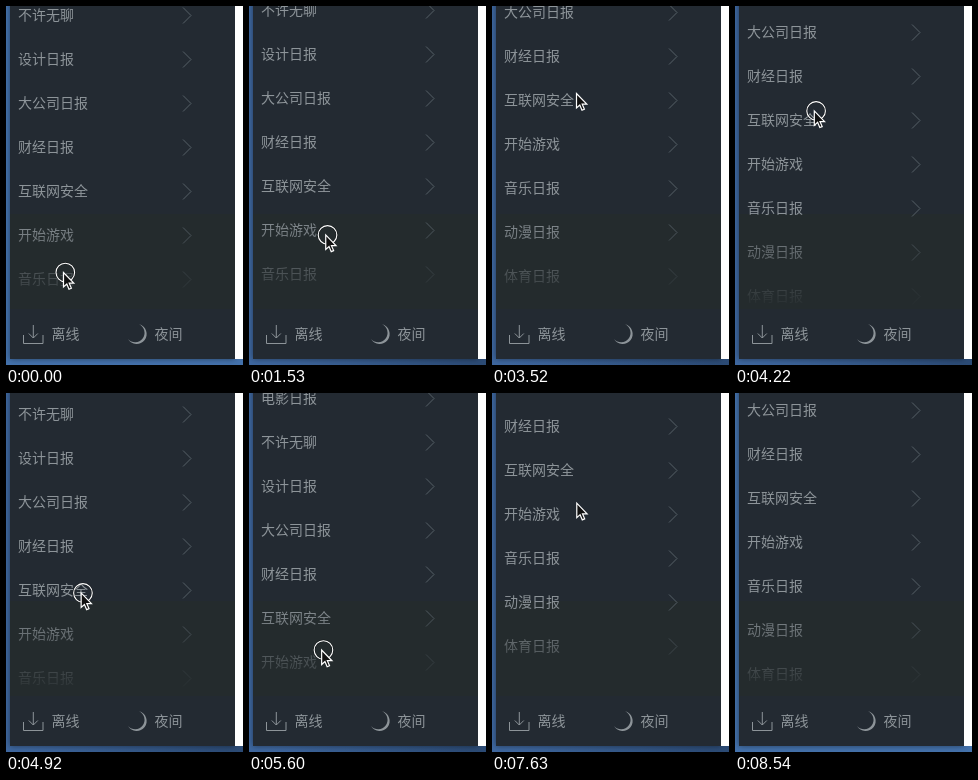
An HTML page with a canvas for the animation above (8650 ms loop, 237 px wide and 359 px high).

```html
<!DOCTYPE html>
<html lang="zh-CN">
<head>
<meta charset="utf-8">
<style>
html, body { margin: 0; width: 237px; height: 359px; overflow: hidden; }
canvas { display: block; }
</style>
</head>
<body>
<canvas width="237" height="359"></canvas>
<script>
const ctx = document.querySelector('canvas').getContext('2d');
const LOOP = 8650, ROW = 44, TOP = 97, END = 17, SLOP = 18, SPRING = 390;
const rows = ['电影日报', '不许无聊', '设计日报', '大公司日报', '财经日报',
  '互联网安全', '开始游戏', '音乐日报', '动漫日报', '体育日报'];

// Pointer moves; it rests in between.
const moves = [
  { from: 710, to: 890, x: 58, y: 273 },
  { from: 1070, to: 1190, x: 75, y: 251 },
  { from: 1370, to: 2540, x: 84, y: 87 },
  { from: 3740, to: 4050, x: 80, y: 77 },
  { from: 4050, to: 5720, x: 72, y: 260, power: 1.5 },
  { from: 6220, to: 6300, x: 73, y: 262 },
  { from: 6300, to: 7330, x: 84, y: 109 },
  { from: 7630, to: 8020, x: 196, y: 365 }
];
const presses = [[0, 50], [1370, 3350], [4050, 5830], [6300, 7630]];

const clamp = (v, lo, hi) => Math.min(hi, Math.max(lo, v));
const easeOut = (p, power) => 1 - (1 - clamp(p, 0, 1)) ** power;

function pointerAt(t) {
  let x = 57, y = 266;
  for (const m of moves) {
    const p = easeOut((t - m.from) / (m.to - m.from), m.power || 1);
    x += (m.x - x) * p;
    y += (m.y - y) * p;
  }
  return { x, y };
}

// Follows the finger, gives half way past the limits, springs back on release.
function scrollAt(t) {
  let home = TOP, position = TOP;
  for (const [press, release] of presses) {
    if (t < press) break;
    const dy = pointerAt(Math.min(t, release)).y - pointerAt(press).y;
    const raw = home + Math.sign(dy) * Math.max(0, Math.abs(dy) - SLOP);
    home = clamp(raw, END, TOP);
    const stretch = (raw - home) / 2;
    position = home + stretch * (1 - easeOut((t - release) / SPRING, 2));
  }
  return Math.floor(position);
}

function rect(color, x, y, w, h) {
  ctx.fillStyle = color;
  ctx.fillRect(x, y, w, h);
}

function fill(path, color) {
  ctx.fillStyle = color;
  ctx.fill(new Path2D(path));
}

function line(path, color, width = 1) {
  ctx.strokeStyle = color;
  ctx.lineWidth = width;
  ctx.stroke(new Path2D(path));
}

function label(text, x, y) {
  ctx.fillStyle = '#8d9499';
  ctx.fillText(text, x, y);
}

function gradient(x0, y0, x1, y1, first, last) {
  const g = ctx.createLinearGradient(x0, y0, x1, y1);
  g.addColorStop(0, first);
  g.addColorStop(1, last);
  return g;
}

function drawPanel(t) {
  const dimmed = t >= 1370 && t < 8540;
  rect(dimmed ? gradient(20, 0, 237, 0, '#3e679f', '#2b4a74') : '#4472ac', 0, 0, 237, 359);
  ctx.save();
  ctx.shadowColor = 'rgba(0,0,0,.45)';
  ctx.shadowBlur = 6;
  rect('#232a32', 4, -10, 225, 363);
  ctx.restore();
  rect('#fff', 229, 0, 8, 353);
  rect('#242b2d', 4, 208, 225, 95);
}

function drawList(top) {
  ctx.save();
  ctx.beginPath();
  ctx.rect(4, 0, 225, 303);
  ctx.clip();
  rows.forEach((name, i) => {
    const y = top + (i - 3) * ROW;
    label(name, 12, y + 5);
    line(`M177 ${y - 7.5}l8 8l-8 8`, '#566067');
  });
  rect(gradient(0, 208, 0, 303, 'rgba(36,43,45,0)', 'rgb(36,43,45)'), 4, 208, 225, 95);
  ctx.restore();
}

function drawBar() {
  rect('#232a32', 4, 303, 225, 50);
  line('M17.5 329v8.5h19.5V329M27.3 319v13M22.8 327.5l4.5 4.5l4.5-4.5', '#8d9499');
  label('离线', 45.5, 333);
  fill('M133 318.3A10 10 0 1 1 122 333A9.4 9.4 0 1 0 133 318.3Z', '#8d9499');
  label('夜间', 148.5, 333);
}

function drawPointer(t) {
  const { x, y } = pointerAt(t);
  if (y > 359) return;
  ctx.save();
  ctx.translate(x, y);
  if (presses.some(([press, release]) => t >= press && t < release)) {
    const ring = 'M-7 .5a9.3 9.3 0 1 0 18.6 0a9.3 9.3 0 1 0-18.6 0';
    line(ring, 'rgba(0,0,0,.4)', 2.2);
    line(ring, '#fff', 1.1);
  }
  const arrow = 'M.5 .5V15L3.8 12L6 17.2L8.4 16.2L6.2 11.2H10.8Z';
  fill(arrow, '#111');
  line(arrow, '#fff', 1.2);
  ctx.restore();
}

function draw(t) {
  ctx.font = '14px "Noto Sans CJK SC", "Noto Sans CJK", sans-serif';
  drawPanel(t);
  drawList(scrollAt(t));
  drawBar();
  drawPointer(t);
}

const start = performance.now();
function tick() {
  draw((performance.now() - start) % LOOP);
  requestAnimationFrame(tick);
}
tick();
</script>
</body>
</html>
```
